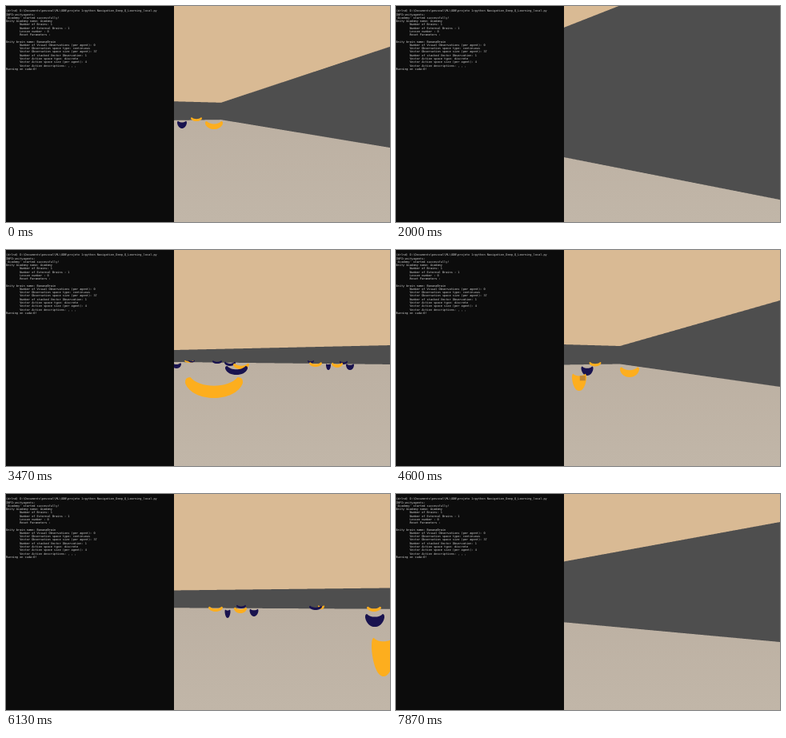
An HTML page with a canvas that plays this animation: 480x270 px, repeating every 8.07 s.

```html
<!DOCTYPE html>
<html lang="en">
<head>
<meta charset="utf-8">
<title>Banana agent</title>
<style>
  html, body { margin: 0; width: 480px; height: 270px; overflow: hidden; background: #0c0c0c; }
  canvas { position: absolute; left: 0; top: 0; display: block; }
  pre {
    position: absolute; left: 0; top: 4.3px; margin: 0; color: #cfcfcf;
    font: 3.57px/4.27px "DejaVu Sans Mono", "Liberation Mono", monospace;
    text-rendering: geometricPrecision;
  }
</style>
</head>
<body>
<canvas id="view" width="480" height="270"></canvas>
<pre>(drlnd) D:\Documents\pessoal\ML\UDB\projeto 1&gt;python Navigation_Deep_Q_Learning_local.py
INFO:unityagents:
'Academy' started successfully!
Unity Academy name: Academy
        Number of Brains: 1
        Number of External Brains : 1
        Lesson number : 0
        Reset Parameters :

Unity brain name: BananaBrain
        Number of Visual Observations (per agent): 0
        Vector Observation space type: continuous
        Vector Observation space size (per agent): 37
        Number of stacked Vector Observation: 1
        Vector Action space type: discrete
        Vector Action space size (per agent): 4
        Vector Action descriptions: , , ,
Running on cuda:0!</pre>
<script>
const ctx = document.getElementById('view').getContext('2d');
const LOOP = 8070, FPS = 15;
const LEFT = 210, RIGHT = 480, BOTTOM = 270;
const CX = 345, HORIZON = 135, FOCAL = 233.8;
const YELLOW = '#fdae1e', BLUE = '#19134f', BROWN = '#bd8435';

// Camera path: [tick, x, z, heading in degrees, ticks to rest there].
// The right wall is x = 0, the back wall z = 0, the eye 1 above the floor.
const path = [
  [0, -5.38, -34.2, 27, 3],
  [16, -3.2, -33.4, 101.7, 1],
  [30, -2.52, -32.2, 60.3, 2],
  [35, -1.95, -31.8, 52, 2],
  [38, -2.45, -32.2, 46, 1],
  [45, -4.6, -33.4, -2, 2],
  [50, -4.8, -33.6, -14, 1],
  [52, -4.9, -33.5, -21.8, 0],
  [64, -5.85, -31.3, -22, 0],
  [69, -6.27, -31.8, 26.7, 2],
  [79, -6.1, -30.3, 24, 2],
  [89, -5.65, -29.2, 42, 2],
  [92, -11, -28.8, -9.2, 0],
  [94, -10.9, -28.3, 0, 2],
  [109, -5.7, -25, 52, 0],
  [118, -5.4, -24.2, 60.4, 3]
];

function makeCamera(x, z, deg) {
  const a = deg * Math.PI / 180;
  return { x, z, sin: Math.sin(a), cos: Math.cos(a) };
}

function cameraAt(tick) {
  let i = path.length - 1;
  while (path[i][0] > tick) i--;
  const from = path[i], to = path[i + 1] || from;
  const start = from[0] + from[4];
  // The agent is reset at tick 92, so that move has no in-between poses.
  const k = tick <= start || to[0] === 92 ? 0 : (tick - start) / (to[0] - start);
  const mix = j => from[j] + (to[j] - from[j]) * k;
  return makeCamera(mix(1), mix(2), mix(3));
}

// Places bananas on the floor from where they appear on screen at a pose:
// [x, foot y, half width, colour, brown tip]
function place(at, list) {
  const pose = path.find(p => p[0] === at);
  const cam = makeCamera(pose[1], pose[2], pose[3]);
  return list.map(([sx, sy, w, color, tip]) => {
    const s = sy - HORIZON, depth = FOCAL / s, side = (sx - CX) / s;
    return {
      x: cam.x + side * cam.cos + depth * cam.sin,
      z: cam.z - side * cam.sin + depth * cam.cos,
      half: w / s, color, tip
    };
  });
}

const scenes = [
  { until: 40, items: place(0, [
    [238, 144, 7, YELLOW], [220, 153, 6, BLUE], [260, 154, 11, YELLOW]
  ]) },
  { until: 65, items: place(52, [
    [229, 141, 6, YELLOW], [232, 140.5, 4, BLUE], [264, 142, 6, BLUE], [381, 141.5, 4, BLUE],
    [422, 143, 5, BLUE], [280, 145, 7, BLUE], [387, 146, 8, YELLOW], [414, 147, 7, YELLOW],
    [213, 148, 6, BLUE], [294, 149, 10, YELLOW], [403, 150, 3, BLUE], [430, 150, 5, BLUE],
    [288, 156, 14, BLUE], [260, 185, 36, YELLOW]
  ]) },
  { until: 92, items: place(69, [
    [249, 145.5, 7.5, YELLOW], [239, 157, 7.5, BLUE], [292, 159, 12, YELLOW],
    [229, 176, 9, YELLOW, true]
  ]) },
  { until: Infinity, items: place(92, [
    [294, 143, 6, BLUE], [394, 144, 4, YELLOW], [387, 145, 8, BLUE], [262, 147, 9, YELLOW],
    [460, 147, 9, YELLOW], [293, 149, 8, YELLOW], [310, 153, 5.5, BLUE], [277, 155, 3.5, BLUE],
    [461, 166, 12, BLUE], [472, 228, 15, YELLOW]
  ]) }
];

function drawRoom(cam) {
  ctx.fillStyle = '#d9ba94';
  ctx.fillRect(LEFT, 0, RIGHT - LEFT, BOTTOM);
  const floor = ctx.createLinearGradient(0, HORIZON, 0, BOTTOM);
  floor.addColorStop(0, '#bcb0a2');
  floor.addColorStop(1, '#c1b6a8');
  ctx.fillStyle = floor;
  ctx.fillRect(LEFT, HORIZON, RIGHT - LEFT, BOTTOM - HORIZON);

  // Pixels from the horizon down to the foot of the nearest wall.
  const foot = x => {
    const k = (x - CX) / FOCAL;
    const dx = cam.sin + k * cam.cos, dz = cam.cos - k * cam.sin;
    return FOCAL * Math.max(dx / -cam.x, dz / -cam.z);
  };
  ctx.beginPath();
  for (let x = LEFT; x <= RIGHT; x++) ctx.lineTo(x, HORIZON - 2 * foot(x));
  for (let x = RIGHT; x >= LEFT; x--) ctx.lineTo(x, HORIZON + foot(x));
  ctx.fillStyle = '#4e4e4e';
  ctx.fill();
}

function drawBanana(cam, item) {
  const dx = item.x - cam.x, dz = item.z - cam.z;
  const depth = dx * cam.sin + dz * cam.cos;
  if (depth < 0.6) return;
  const s = FOCAL / depth;
  const w = item.half * s, h = 0.52 * s;
  const notch = h * Math.min(0.42, item.half * 0.6);
  ctx.save();
  ctx.translate(CX + s * (dx * cam.cos - dz * cam.sin), HORIZON + s);
  ctx.fillStyle = item.color;
  ctx.beginPath();
  ctx.moveTo(-w * 0.82, -h);
  ctx.bezierCurveTo(-w * 0.5, -h + notch * 1.3, w * 0.5, -h + notch * 1.3, w * 0.82, -h);
  ctx.quadraticCurveTo(w * 1.02, -h, w, -h * 0.72);
  ctx.bezierCurveTo(w * 0.75, h * 0.24, -w * 0.75, h * 0.24, -w, -h * 0.72);
  ctx.quadraticCurveTo(-w * 1.02, -h, -w * 0.82, -h);
  ctx.fill();
  if (item.tip) {
    ctx.fillStyle = BROWN;
    ctx.fillRect(0.02 * s, -0.46 * s, 0.17 * s, 0.15 * s);
  }
  ctx.restore();
}

function draw(now) {
  const tick = Math.floor((now % LOOP + 4) * FPS / 1000);
  const cam = cameraAt(tick);
  ctx.clearRect(0, 0, 480, BOTTOM);
  ctx.save();
  ctx.beginPath();
  ctx.rect(LEFT, 0, RIGHT - LEFT, BOTTOM);
  ctx.clip();
  drawRoom(cam);
  scenes.find(s => tick < s.until).items.forEach(item => drawBanana(cam, item));
  ctx.restore();
}

const began = performance.now();
function loop() {
  draw(performance.now() - began);
  requestAnimationFrame(loop);
}
loop();
</script>
</body>
</html>
```
